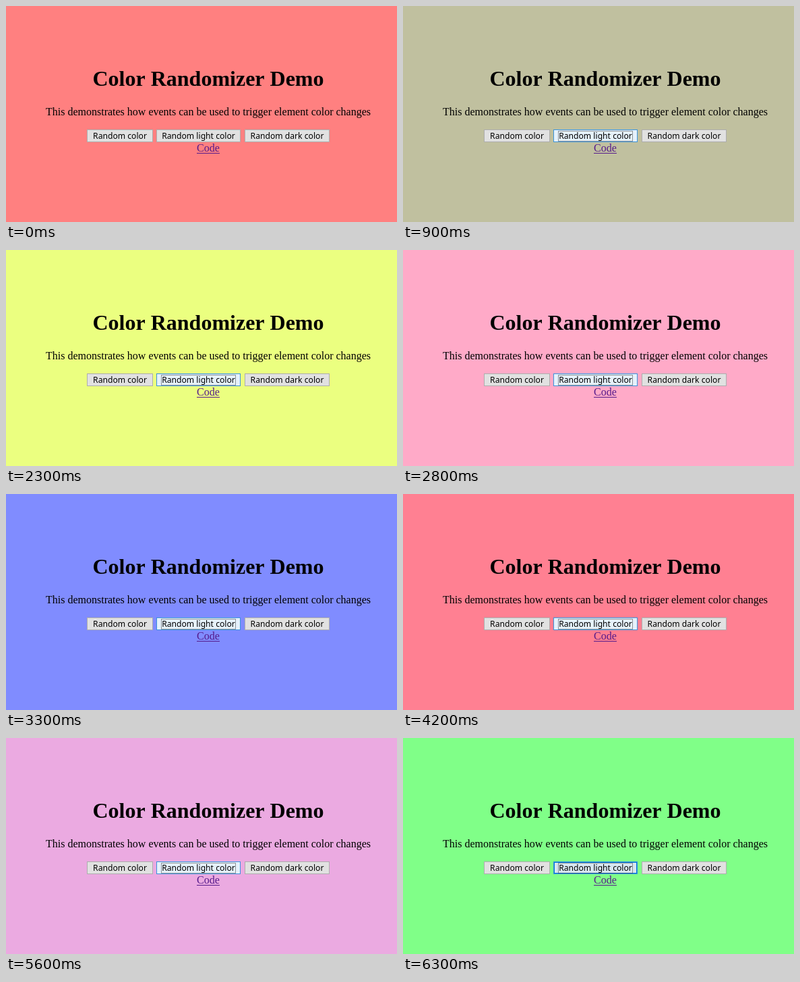
Write an HTML page with a canvas that moves like this. It is 580x322 px and loops after 6.8 s.

```html
<!DOCTYPE html>
<html lang="en">
<head>
<meta charset="utf-8">
<title>Color Randomizer Demo</title>
<style>
  html, body { margin: 0; width: 100%; height: 100%; overflow: hidden; }
  canvas { display: block; width: 580px; height: 322px; }
</style>
</head>
<body>
<canvas id="stage" width="580" height="322"></canvas>
<script>
const LOOP = 6800;
const ctx = document.getElementById('stage').getContext('2d');
const SERIF = '"Liberation Serif", "Times New Roman", serif';
const SANS = '"Noto Sans", "Open Sans", sans-serif';

// Each click picks a light colour; some clicks pass through a blend for one tick.
const clicks = [
  { at: 0, rgb: [255, 128, 128] },
  { at: 900, rgb: [128, 255, 190], blend: true },
  { at: 1300, rgb: [255, 155, 128], blend: true },
  { at: 1800, rgb: [190, 150, 255] },
  { at: 2300, rgb: [235, 255, 128] },
  { at: 2700, rgb: [255, 170, 200], blend: true },
  { at: 3200, rgb: [128, 140, 255], blend: true },
  { at: 3700, rgb: [180, 235, 150] },
  { at: 4200, rgb: [255, 128, 146] },
  { at: 5100, rgb: [128, 242, 255] },
  { at: 5600, rgb: [235, 170, 225] },
  { at: 6100, rgb: [128, 255, 136] }
];

const STYLES = {
  normal: { fill: '#e1e1e1', line: '#adadad' },
  hover: { fill: '#e5f1fb', line: '#3a93dc' },
  pressed: { fill: '#d8e6f0', line: '#3a93dc', inner: '#0078d7' }
};

function background(t) {
  let i = clicks.length - 1;
  while (clicks[i].at > t) i--;
  const { at, rgb, blend } = clicks[i];
  const mixed = blend && t < at + 100
    ? rgb.map((v, k) => Math.round((v + clicks[i - 1].rgb[k]) / 2))
    : rgb;
  return `rgb(${mixed.join(',')})`;
}

function text(str, y, font, color = '#000', x = 300) {
  ctx.font = font;
  ctx.fillStyle = color;
  ctx.fillText(str, x, y);
}

function outline(x, y, w, h, color) {
  ctx.strokeStyle = color;
  ctx.lineWidth = 1;
  ctx.strokeRect(x + 0.5, y + 0.5, w - 1, h - 1);
}

function button(label, x, w, state, focused) {
  const y = 184, h = 19, style = STYLES[state];
  ctx.fillStyle = style.fill;
  ctx.fillRect(x, y, w, h);
  outline(x, y, w, h, style.line);
  if (style.inner) outline(x + 1, y + 1, w - 2, h - 2, style.inner);
  if (focused) {
    ctx.setLineDash([1, 1]);
    outline(x + 7, y + 2, w - 14, h - 3, '#333');
    ctx.setLineDash([]);
  }
  text(label, 198, `12.15px ${SANS}`, '#000', x + w / 2);
}

function draw(t) {
  ctx.fillStyle = background(t);
  ctx.fillRect(0, 0, 580, 322);
  ctx.textAlign = 'center';

  text('Color Randomizer Demo', 119, `bold 32px ${SERIF}`);
  text('This demonstrates how events can be used to trigger element color changes',
    163, `16px ${SERIF}`);

  const light = t < 700 ? 'normal' : t < 6300 ? 'hover' : 'pressed';
  const dark = t >= 300 && t < 700 ? 'hover' : 'normal';
  button('Random color', 120, 98, 'normal');
  button('Random light color', 223, 125, light, t >= 900);
  button('Random dark color', 354, 126, dark);

  text('Code', 217, `16px ${SERIF}`, '#551a8b');
  ctx.fillRect(283, 219, 34, 1);
}

const start = performance.now();
function tick() {
  draw((performance.now() - start) % LOOP);
  requestAnimationFrame(tick);
}
tick();
</script>
</body>
</html>
```
